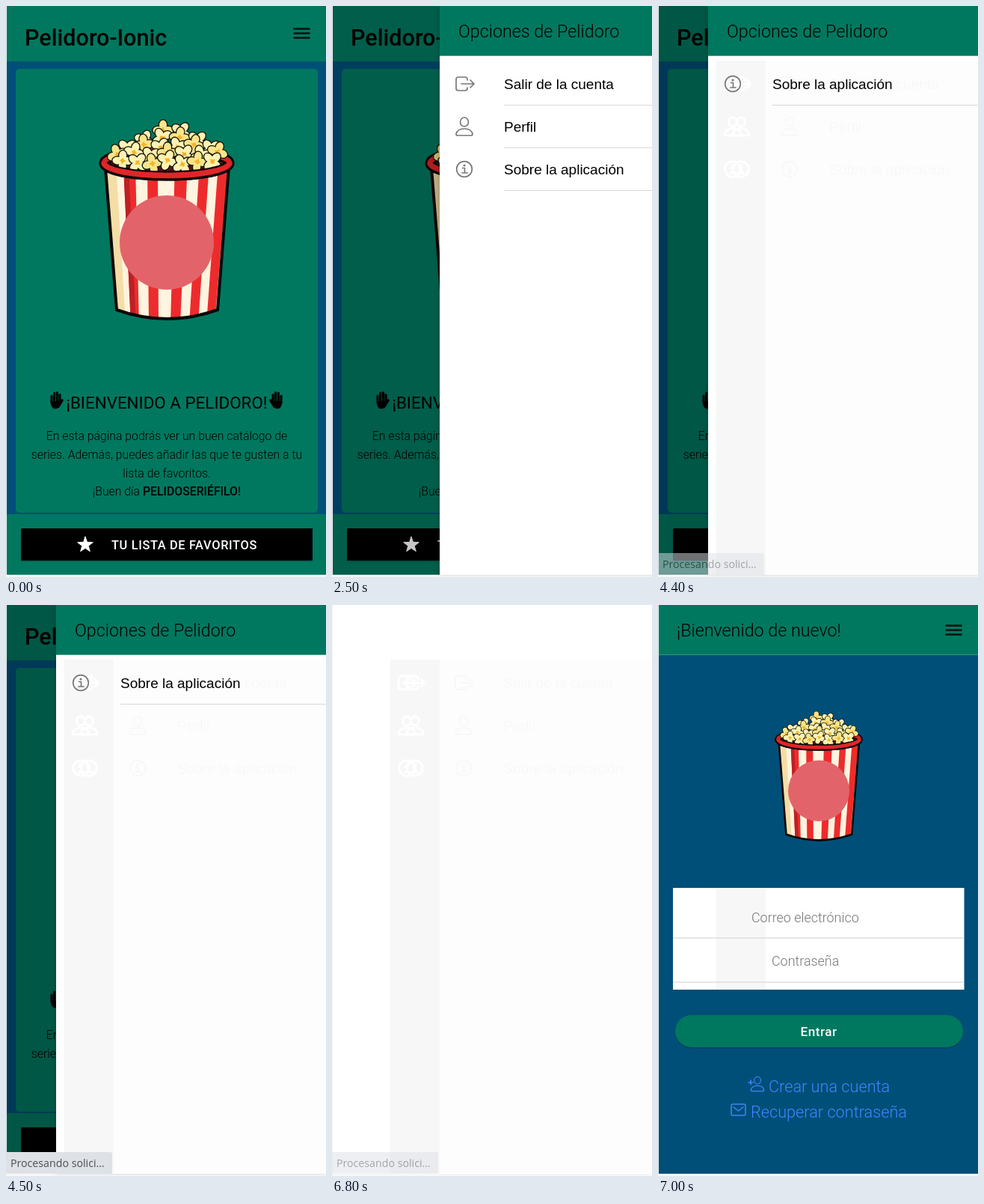
An HTML page that plays this animation: 428 by 763 pixels, repeating every 8500 ms.

```html
<!DOCTYPE html>
<html lang="es">
<head>
<meta charset="utf-8">
<title>Pelidoro</title>
<style>
  html, body { margin: 0; height: 100%; overflow: hidden; background: #fff; }
  svg { display: block; width: 100vw; height: 100vh; font-family: Roboto, sans-serif; }
  .green { fill: #00785f; }
  .blue { fill: #004f78; }
  .mid { text-anchor: middle; }
  .bar { font-size: 23.3px; font-weight: 300; }
  .body { font-size: 15.8px; font-weight: 300; }
  .field { font-size: 17.9px; font-weight: 300; fill: #777; }
  .link { font-size: 21.7px; font-weight: 300; fill: #3d86ff; }
  .btn { font-weight: 500; fill: #fff; }
  .line { fill: none; stroke-linecap: round; stroke-linejoin: round; }
  .item { font: 19px "Liberation Sans", Arial, sans-serif; }
  #trace { fill: #f8f8f8; }
  #drawer { filter: drop-shadow(0 0 3px #0003); }
  #status text { font: 14.2px "Open Sans", sans-serif; fill: #4a4d52; }
</style>
</head>
<body>
<svg viewBox="0 0 428 763" preserveAspectRatio="none">
  <defs>
    <clipPath id="tub"><path d="M133 216L148 406Q215 430 283 406L298 216Z"/></clipPath>

    <g id="exit" class="line">
      <path d="M4 -5V-6Q4 -9 1 -9H-8Q-11 -9 -11 -6V6Q-11 9 -8 9H1Q4 9 4 6V5M-4 0H13M8 -5L13 0L8 5"/>
    </g>
    <g id="person" class="line">
      <ellipse cy="-6" rx="5.5" ry="6"/>
      <path d="M0 3C-6 3 -10 6 -11 10Q-11 12 -9 12H9Q11 12 11 10C10 6 6 3 0 3Z"/>
    </g>
    <g id="info" class="line">
      <circle r="10.3"/><path d="M-2.5 -1.5H.5V5M-3 5H4"/><circle cy="-5" r=".7"/>
    </g>
    <path id="burger" d="M384.5 30.5H406.5M384.5 36.5H406.5M384.5 42.5H406.5" stroke="#04120e" stroke-width="2.6"/>
    <g id="hand" class="line" stroke="#000">
      <path d="M-6 -5V4M-2.3 -9V3M1.5 -9.5V3M5 -6.5V4" stroke-width="3.1"/>
      <path d="M8 1L3 9" stroke-width="3.4"/>
      <path d="M-7.5 2H6.5L4 10Q1 13 -3 12Q-7 10 -7.5 2Z" fill="#000" stroke="none"/>
    </g>

    <g id="popcorn">
      <g clip-path="url(#tub)">
        <rect x="125" y="210" width="180" height="215" fill="#fff4df"/>
        <path d="M125 210H147L160 425H140Z" fill="#f4dda6"/>
        <g id="stripes" fill="#ee2b2c"></g>
        <path d="M157 215H164L174 425H167Z" fill="#bd2024"/>
      </g>
      <path d="M133 216L148 406Q215 430 283 406L298 216" fill="none" stroke="#080808" stroke-width="4"/>
      <ellipse cx="215" cy="210" rx="84" ry="17" fill="#5d1212" stroke="#080808" stroke-width="13"/>
      <ellipse cx="215" cy="210" rx="84" ry="17" fill="none" stroke="#d92325" stroke-width="7"/>
      <g id="kernels"></g>
      <g fill="none">
        <path d="M131 210A84 17 0 0 0 299 210" stroke="#080808" stroke-width="13"/>
        <path d="M131 209.5A84 17 0 0 0 299 209.5" stroke="#e02628" stroke-width="7.5"/>
      </g>
      <circle cx="215" cy="316" r="63" fill="#e2646a"/>
    </g>
  </defs>

  <rect width="428" height="763" fill="#fff"/>

  <g id="home">
    <rect class="green" x="1" width="427" height="760"/>
    <rect class="blue" x="1" y="74" width="427" height="605"/>
    <rect class="green" x="13" y="84" width="404" height="593" rx="5"/>
    <text x="25" y="53" font-size="30.5" font-weight="500">Pelidoro-Ionic</text>
    <use href="#burger"/>
    <use href="#popcorn"/>
    <use href="#hand" x="67" y="526"/>
    <use href="#hand" transform="translate(362 526) scale(-1 1)"/>
    <text class="mid" x="215" y="538" font-size="22.4">¡BIENVENIDO A PELIDORO!</text>
    <g class="mid body">
      <text x="215" y="580">En esta página podrás ver un buen catálogo de</text>
      <text x="215" y="605">series. Además, puedes añadir las que te gusten a tu</text>
      <text x="215" y="630">lista de favoritos.</text>
      <text x="215" y="654">¡Buen día <tspan font-weight="500">PELIDOSERIÉFILO!</tspan></text>
    </g>
    <rect x="20" y="699" width="390" height="43.5" rx="2" fill="#0003"/>
    <rect x="20" y="698" width="390" height="43"/>
    <path id="star" class="line" style="fill:#fff" stroke="#fff"/>
    <text class="btn" x="141" y="726" font-size="16.4" letter-spacing=".65">TU LISTA DE FAVORITOS</text>
    <rect id="shade" x="1" width="427" height="760"/>
  </g>

  <g id="drawer">
    <rect width="361" height="760" fill="#fff"/>
    <rect class="green" width="361" height="67"/>
    <rect y="66" width="361" height="1" fill="#5fa696"/>
    <text class="bar" x="25" y="42">Opciones de Pelidoro</text>
  </g>

  <g id="trace">
    <path d="M78 73H144V760H78Z" fill="#f7f7f7"/>
    <path d="M144 73H428V760H144Z" fill="#fdfdfd"/>
    <g id="traceIcons" stroke="#fff" stroke-width="3">
      <use href="#exit" x="100" y="104"/><use href="#person" x="100" y="161"/><use href="#info" x="100" y="218"/>
    </g>
    <use href="#traceIcons" x="11"/>
    <g stroke="#f8f8f8" stroke-width="2">
      <use href="#exit" x="176" y="104"/><use href="#person" x="176" y="161"/><use href="#info" x="176" y="218"/>
    </g>
    <text class="item" x="229" y="111">Salir de la cuenta</text>
    <text class="item" x="229" y="168">Perfil</text>
    <text class="item" x="229" y="225">Sobre la aplicación</text>
  </g>

  <g id="rows" stroke-width="1.7">
    <g id="account">
      <g stroke="#777"><use href="#exit" x="33" y="104"/><use href="#person" x="33" y="161"/></g>
      <g stroke="none">
        <text class="item" x="86" y="111">Salir de la cuenta</text>
        <text class="item" x="86" y="168">Perfil</text>
      </g>
      <path d="M86 189.5H361M86 246.5H361" stroke="#d8d8d8" stroke-width="1"/>
    </g>
    <path d="M86 132.5H361" stroke="#d8d8d8" stroke-width="1"/>
    <g id="about">
      <use href="#info" x="33" y="104" stroke="#777"/>
      <text class="item" x="86" y="111">Sobre la aplicación</text>
    </g>
  </g>

  <g id="login">
    <rect class="blue" x="1" width="427" height="760"/>
    <rect class="green" x="1" width="427" height="67"/>
    <rect x="1" y="66" width="427" height="1" fill="#3f907e"/>
    <text class="bar" x="25" y="42">¡Bienvenido de nuevo!</text>
    <use href="#burger" y="-3"/>
    <use href="#popcorn" transform="translate(75.25 43.5) scale(.65 .648)"/>
    <rect x="20" y="378" width="389.5" height="136" fill="#fff"/>
    <rect x="78" y="378" width="66" height="136" fill="#f7f7f7"/>
    <path d="M20 445H408M20 504H408" stroke="#dedede" stroke-width="1.5"/>
    <text class="field" x="125" y="424">Correo electrónico</text>
    <text class="field" x="152" y="482">Contraseña</text>
    <rect x="23" y="549" width="385" height="43.5" rx="21.5" fill="#0003"/>
    <rect class="green" x="23" y="548" width="385" height="43" rx="21.5"/>
    <text class="btn mid" x="215" y="576" font-size="17.2" letter-spacing=".5">Entrar</text>
    <g class="line" stroke="#3d86ff" stroke-width="1.5">
      <use href="#person" transform="translate(133 640) scale(.8)"/>
      <path d="M121 638H127M124 635V641"/>
      <rect x="98" y="667" width="19" height="15" rx="2"/>
      <path d="M101 671L107.5 676L114 671"/>
    </g>
    <text class="link" x="148" y="651">Crear una cuenta</text>
    <text class="link" x="124" y="685">Recuperar contraseña</text>
  </g>

  <path d="M0 761.5H428" stroke="#ececec"/>
  <path d="M.5 0V760" stroke="#f4f4f4"/>

  <g id="status">
    <path d="M0 731H139Q142 731 142 734V760H0Z" fill="#dee1e6"/>
    <text x="6" y="751">Procesando solici…</text>
  </g>
</svg>
<script>
const $ = id => document.getElementById(id);
const LOOP = 8500, OPEN = 67, CLOSED = 428;

// Tapering stripes: top left, top right, bottom right, bottom left
$('stripes').innerHTML = [
  [157, 173, 178, 167], [189, 203, 204, 191], [226, 243, 233, 220],
  [259, 272, 257, 245], [284, 297, 279, 268]
].map(([a, b, c, d]) => `<path d="M${a} 210H${b}L${c} 425H${d}Z"/>`).join('');

// A four-petalled kernel, outlined as one shape
function kernel(x, y, turn, tint) {
  const petals = [0, 90, 180, 270].map(a =>
    `<ellipse cx="7" rx="6.5" ry="5" transform="rotate(${a})"/>`).join('');
  return `<g transform="translate(${x} ${y}) rotate(${turn})">
    <g stroke="#151208" stroke-width="2.6">${petals}</g>
    <g fill="${tint}">${petals}</g>
    <path d="M-4 0L-1 -2L0 -5L2 -1L5 1L1 2L0 4L-2 2Z" fill="#f7b425"/>
  </g>`;
}

// Rows from back to front: height, first x, last x, count
$('kernels').innerHTML = [
  [166, 210, 234, 2], [177, 185, 256, 4], [188, 162, 274, 6],
  [198, 149, 283, 7], [209, 156, 276, 7]
].map(([y, from, to, n], row) => Array.from({ length: n }, (_, i) => kernel(
  from + (to - from) * i / (n - 1),
  y + 3 * Math.sin(i * 2.4 + row),
  i * 37 + row * 23,
  (i + row) % 3 ? '#fdf3b4' : '#f8e58a'
)).join('')).join('');

$('star').setAttribute('d', 'M' + Array.from({ length: 10 }, (_, i) => {
  const r = i % 2 ? 4.4 : 10.8, a = i * Math.PI / 5;
  return `${(106 + r * Math.sin(a)).toFixed(1)} ${(720 - r * Math.cos(a)).toFixed(1)}`;
}).join('L') + 'Z');

// Start time, page, drawer x, signed in, status opacity
const steps = [
  [0, 'home', CLOSED, true, 0],
  [2400, 'home', 367, true, 0],
  [2500, 'home', 144, true, 0],
  [2600, 'home', 78, true, 0],
  [2700, 'home', OPEN, true, 0],
  [4400, 'home', OPEN, false, .5],
  [4500, 'home', OPEN, false, 1],
  [5500, 'blank', CLOSED, false, 1],
  [6800, 'blank', CLOSED, false, .5],
  [6900, 'blank', CLOSED, false, .15],
  [7000, 'login', CLOSED, false, 0]
];

const show = (id, on) => { $(id).style.display = on ? '' : 'none'; };
let current;

function draw() {
  const t = performance.now() % LOOP;
  const step = steps.findLast(s => s[0] <= t);
  if (step !== current) {
    current = step;
    const [, page, x, signedIn, status] = step;
    const open = x < CLOSED;
    show('home', page === 'home');
    show('login', page === 'login');
    show('drawer', open);
    show('rows', open);
    show('trace', x === OPEN || page === 'blank');
    show('account', signedIn);
    for (const id of ['drawer', 'rows']) $(id).setAttribute('transform', `translate(${x})`);
    $('about').setAttribute('transform', `translate(0 ${signedIn ? 114 : 0})`);
    $('shade').setAttribute('opacity', .28 * (CLOSED - x) / (CLOSED - OPEN));
    $('status').setAttribute('opacity', status);
  }
  requestAnimationFrame(draw);
}
draw();
</script>
</body>
</html>
```
